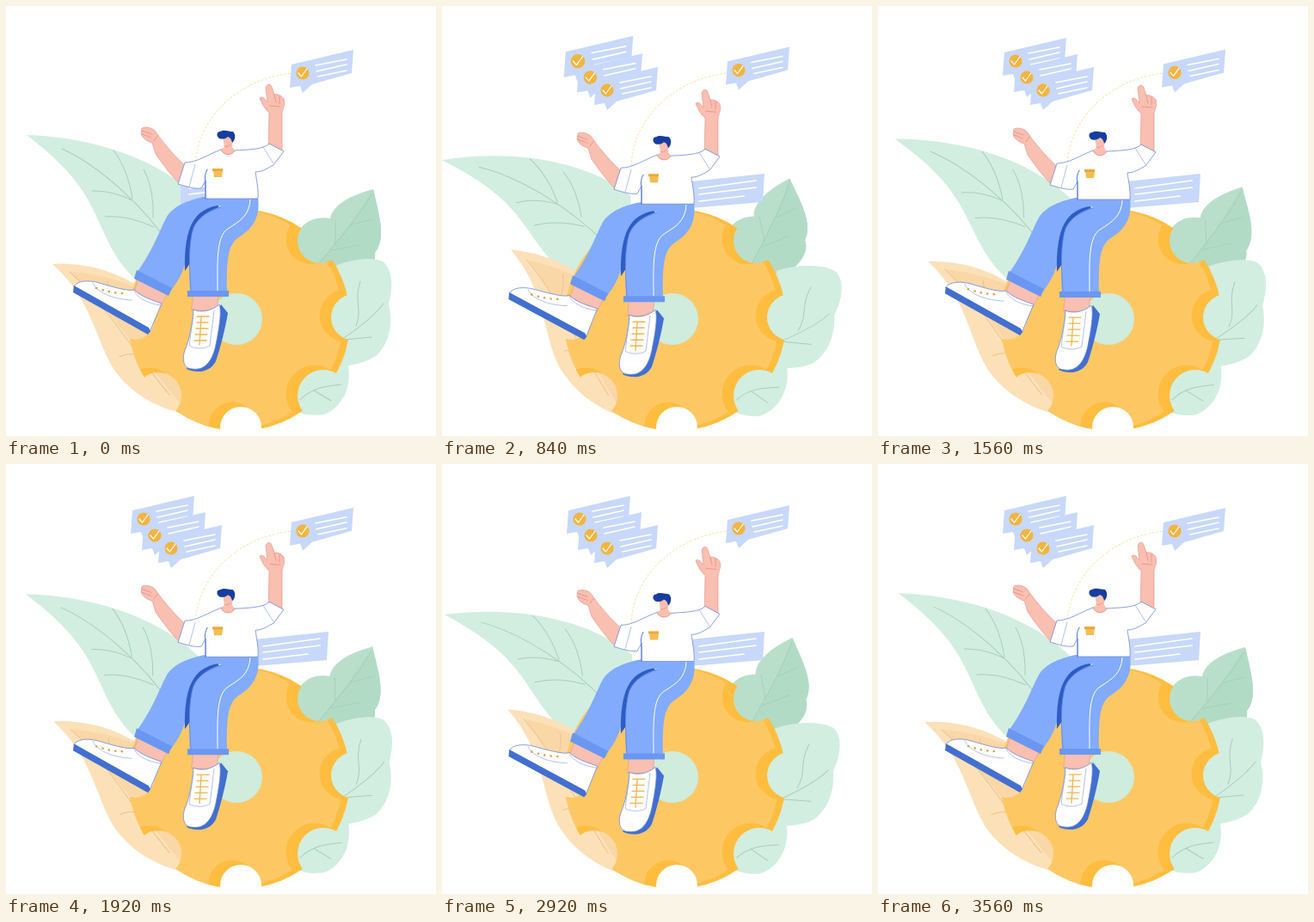
Write an HTML page that moves like this. It is 500 px wide and 500 px high and loops after 3600 ms.

```html
<!DOCTYPE html>
<html lang="en">
<head>
<meta charset="utf-8">
<style>
html, body { margin: 0; width: 100%; height: 100%; overflow: hidden; background: #fff }
svg { display: block; width: 100vw; height: 100vh; fill: none; stroke-linecap: round; stroke-linejoin: round }
.vein { stroke: #a8cfba; stroke-width: 1 }
.mint { fill: #d2eee0 }
.skin { fill: #f9bfb1; stroke: #e89a90; stroke-width: .7 }
.crease { stroke: #e58f86; stroke-width: .8 }
.white { fill: #fff; stroke: #6a89dd; stroke-width: .8 }
.jeans { fill: #82abfd }
.cuff { fill: #6a97f2 }
.sole { fill: #426fd0 }
.lace { stroke: #f0b64c; stroke-width: 1.3 }
.eyelet { stroke: #d9a648; stroke-width: 2.6; stroke-dasharray: .1 7.5 }
.fine { stroke: #8fa8e6; stroke-width: .7 }
</style>
</head>
<body>
<svg viewBox="0 0 500 500">
  <defs>
    <g id="note">
      <path fill="#c8d8fb" d="M-13-10 59-27 57 0 11 13 0 23-3 15-15 17Z"/>
      <circle r="7.6" fill="#f4b440"/>
      <path stroke="#fff" stroke-width="1.2" d="M-5 0-1.5 4 5-5"/>
      <path stroke="#fff" stroke-width="1.5" d="M15-9 51-16M16-2 51-10M18 4 51-3"/>
    </g>
    <g id="bites">
      <circle cx="365" cy="273" r="26"/><circle cx="405" cy="362" r="27"/>
      <circle cx="369" cy="453" r="30"/><circle cx="273" cy="490" r="24"/>
      <circle cx="177" cy="453" r="27"/><circle cx="149" cy="364" r="24"/>
    </g>
    <mask id="bitten">
      <circle cx="271" cy="365" r="129" fill="#fff"/>
      <use href="#bites" fill="#000"/>
    </mask>
    <mask id="face">
      <circle cx="264" cy="364" r="128" fill="#fff"/>
      <use href="#bites" x="-10" y="-2" fill="#000" stroke="#000" stroke-width="7"/>
    </mask>
  </defs>

  <g id="bigLeaf">
    <path class="mint" d="M24 150C92 152 180 174 232 232L220 300 152 319C125 296 114 262 103 240 86 203 60 178 24 150Z"/>
    <path class="vein" d="M65 166C105 184 160 230 195 285M125 168C138 185 144 205 147 224M160 190C169 206 172 228 171 246M100 215C120 214 135 220 147 226M115 245C138 243 157 250 172 257"/>
  </g>
  <g id="amberLeaf">
    <path fill="#fce0b8" d="M54 300C92 298 132 308 165 334L215 475C178 470 148 452 127 425 103 388 101 342 54 300Z"/>
    <path fill="#fad7a6" d="M76 309C120 313 150 325 165 334L215 475C180 440 140 375 76 309Z"/>
    <path stroke="#ecc48c" d="M74 309C115 345 150 405 190 452M118 352Q122 334 118 320M132 408Q145 402 154 407"/>
  </g>
  <g id="crownLeaf">
    <path fill="#b9dfcb" d="M427 213C401 220 380 231 377 247 356 243 336 254 334 285L345 322 385 326C408 320 432 305 429 287 443 270 433 240 427 213Z"/>
    <path fill="#b2dbc6" d="M427 213C412 238 390 268 350 318L385 326C408 320 432 305 429 287 443 270 433 240 427 213Z"/>
    <path class="vein" d="M425 219C412 243 384 275 350 316M383 249V278M378 284 411 278M402 254 427 248"/>
  </g>
  <g id="sideLeaf">
    <path class="mint" d="M370 308C392 296 424 290 438 297 452 309 449 331 445 347 451 370 445 394 430 407 414 417 395 420 372 420L360 380Z"/>
    <path class="vein" d="M412 320C404 345 415 352 407 372M439 346C426 364 400 382 375 398M392 388 425 385"/>
  </g>
  <g id="lowLeaf">
    <path class="mint" d="M330 440C350 420 385 410 398 418 402 442 392 466 370 475 350 478 335 472 330 465Z"/>
    <path class="vein" d="M342 458C355 444 372 442 390 440M358 447 378 459"/>
  </g>

  <g mask="url(#bitten)">
    <path fill="#ffbd3f" d="M140 230H405V495H140Z"/>
    <path fill="#fdc864" mask="url(#face)" d="M135 230H405V495H135Z"/>
  </g>
  <circle cx="268" cy="364" r="30" fill="#cfecdc"/>

  <path stroke="#f6dd93" stroke-width=".9" stroke-dasharray="2 2.6" d="M220 186C222 130 270 85 332 78"/>
  <g id="panel">
    <path fill="#c8d8fb" d="M0 9 86 0 84 33 0 40Z"/>
    <path stroke="#fff" stroke-width="1.7" d="M10 17 76 8M10 24 76 16M10 32 62 26"/>
  </g>
  <use id="pinned" href="#note"/>
  <use class="pop" href="#note"/>
  <use class="pop" href="#note"/>
  <use class="pop" href="#note"/>

  <g id="person">
    <path class="skin" d="M209 186C197 176 187 163 181 156L173 145C169 141 162 140 158 142L157 148C158 153 163 157 170 159L174 172C182 183 190 195 201 206Z"/>
    <path class="crease" d="M158 145 169 149M158 149 169 153M172 157 176 151"/>
    <path class="skin" d="M305 170 306 124C300 119 297 112 295 107 298 104 302 109 304 112L302 95C303 90 308 90 309 94L312 103C317 102 321 105 323 108 325 114 322 119 321 124L321 170Z"/>
    <path class="crease" d="M312 103 314 112M318 105 318 114M307 116 319 117"/>

    <path class="skin" d="M155 315 189 332 180 349 149 333Z"/>
    <g id="kick">
      <path class="white" d="M79 326C83 319 95 319 105 321 122 326 141 332 149 330 157 338 170 342 181 346L167 379Z"/>
      <path class="sole" d="M79 325 166 374 168 378 165 382 78 333Z"/>
      <path class="fine" d="M101 322C106 334 126 341 146 342M149 331C152 339 165 346 180 348"/>
      <path class="eyelet" d="M105 328C117 332 127 334 137 334"/>
    </g>

    <path class="skin" d="M218 335H247L245 354H216Z"/>
    <path class="sole" d="M250 347 258 357C255 375 249 398 244 413 237 427 220 427 210 422Z"/>
    <path class="white" d="M218 353C226 357 239 355 248 347 251 355 248 374 244 394 240 413 231 424 217 422 205 422 205 409 208 400 213 389 217 370 218 353Z"/>
    <path class="fine" d="M218 358 213 395C219 399 231 399 237 395L242 354"/>
    <path class="lace" d="M222 361H236M222 368H235M221 375H235M220 382H234M219 389H233M227 361 225 394"/>

    <path class="jeans" d="M230 222H268L246 234C222 242 211 264 208 300 204 315 197 323 192 331L152 310C171 284 178 262 187 245 196 231 215 225 230 222Z"/>
    <path fill="#2d5cc4" d="M246 232C219 237 207 256 208 308L216 296 222 262 250 236Z"/>
    <path class="cuff" d="M152 307 193 328 189 337 149 317Z"/>
    <path class="jeans" d="M240 222H293C296 244 288 258 272 268 259 276 256 290 257 333H214C213 305 212 276 218 258 224 244 238 237 250 233Z"/>
    <path stroke="#fff" d="M284 225C283 244 272 250 258 259 244 268 246 300 246 331"/>
    <path stroke="#5a87ea" stroke-width=".8" d="M218 258C224 244 238 238 250 234M215 331C213 303 212 276 218 258"/>
    <path class="cuff" d="M211 331H259V338H211Z"/>

    <path class="white" d="M250 167C234 173 222 182 208 182L200 207C210 210 219 213 227 212L232 203V224H293C294 214 291 201 290 193 299 193 306 187 311 185L323 169 306 160C300 167 280 167 266 168Z"/>
    <path class="fine" d="M220 184 213 210M299 164 311 183"/>
    <path stroke="#4a72d4" d="M232 224V205Q230 197 234 190"/>
    <path fill="#f9bfb1" d="M252 151H264L263 164 266 168C263 175 252 174 250 167L254 164Z"/>
    <path class="crease" d="M254 163Q258 165 261 161M250 167C252 174 263 175 266 168"/>
    <path fill="#173d9f" d="M248 154C244 151 245 146 249 146 253 143 260 146 264 146 268 150 266 157 263 159 262 154 260 153 258 152 255 155 251 155 248 154Z"/>
    <path fill="#f7bd52" d="M241 190H252L251 199H242Z"/>
    <path fill="#eeaa3a" d="M240 189H252V192H240Z"/>
  </g>
</svg>
<script>
const LOOP = 3600, SWAY = 1800;
const el = id => document.getElementById(id);
const place = (node, transform) => node.setAttribute('transform', transform);
const ease = p => (1 - Math.cos(Math.PI * Math.min(1, Math.max(0, p)))) / 2;

// leaf, pivot x, pivot y, swing in degrees
const leaves = [
  ['bigLeaf', 165, 292, -11],
  ['amberLeaf', 186, 480, 8],
  ['crownLeaf', 358, 312, -12.5],
  ['sideLeaf', 383, 412, 11],
  ['lowLeaf', 345, 470, 4]
];
// centre x, centre y, start time
const pops = [[182, 61, 465], [195, 80, 310], [214, 95, 150]];
const notes = document.querySelectorAll('.pop');

function popScale(age) {
  if (age <= 0) return 0;
  return age < 300 ? 1.1 * age / 300 : 1.1 - 0.1 * ease((age - 300) / 360);
}

function draw(now) {
  const t = now % LOOP;
  const sway = (1 - Math.cos(2 * Math.PI * t / SWAY)) / 2;
  for (const [id, x, y, swing] of leaves) place(el(id), `rotate(${swing * sway} ${x} ${y})`);
  place(el('person'), `translate(0 ${6.3 * sway})`);
  place(el('kick'), `rotate(${-1.2 * sway} 168 365)`);
  place(el('pinned'), `translate(345 ${78 - 3.5 * sway})`);
  place(el('panel'), `translate(${203 + 86 * ease(t / 670)} 195)`);
  pops.forEach(([x, y, start], i) =>
    place(notes[i], `translate(${x} ${y}) scale(${popScale(t - start)}) translate(-22 3)`));
}

const begin = performance.now();
function tick() {
  draw(performance.now() - begin);
  requestAnimationFrame(tick);
}
tick();
</script>
</body>
</html>
```
